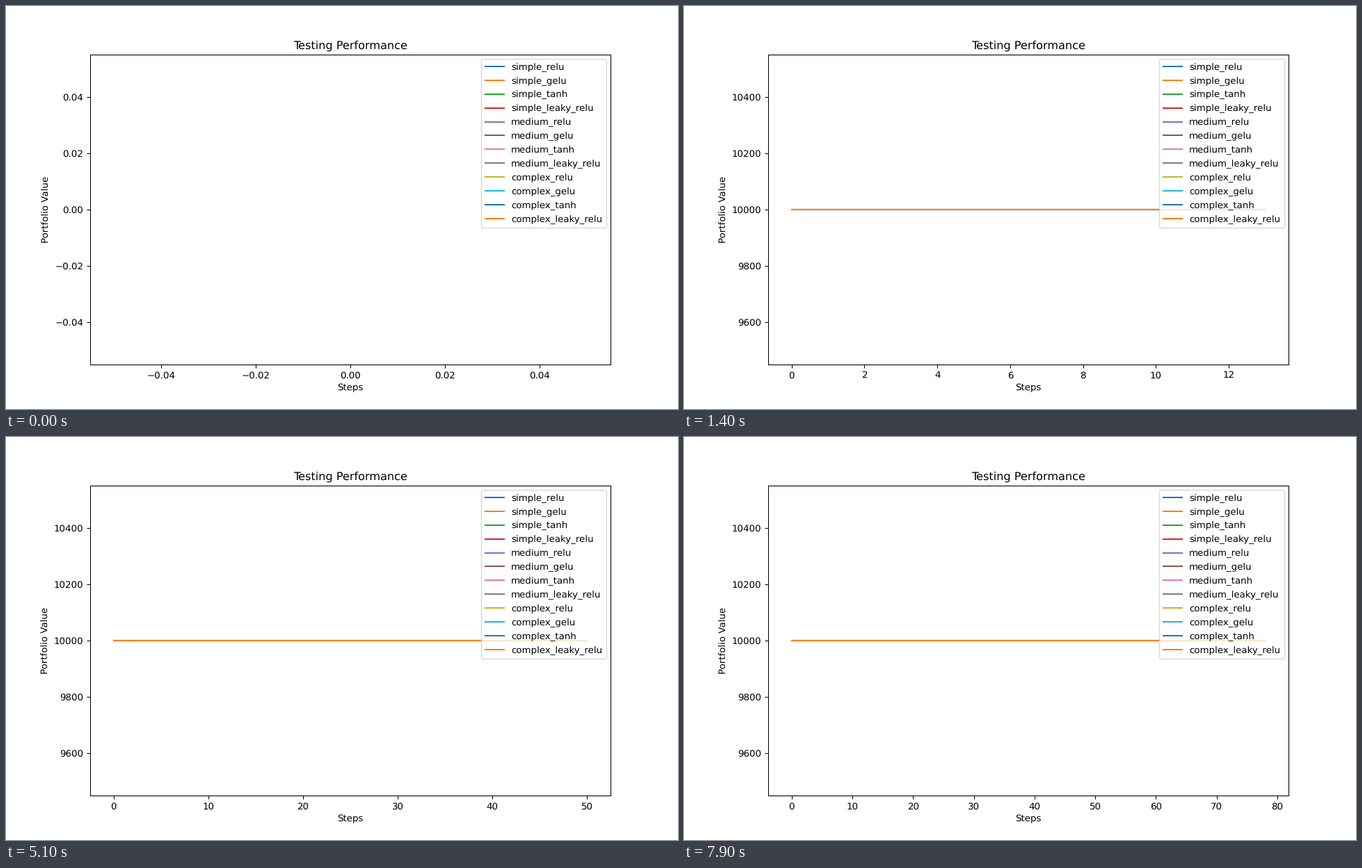
A matplotlib script that plays this animation: 966 px wide and 580 px high, repeating every 8 s.

```python
import itertools

import matplotlib.pyplot as plt
import numpy as np
from matplotlib.animation import FuncAnimation

WIDTH, HEIGHT, DPI = 966, 580, 96.6
FRAMES = 80
INTERVAL = 100
START_VALUE = 10000

sizes = ["simple", "medium", "complex"]
activations = ["relu", "gelu", "tanh", "leaky_relu"]

plt.rcParams.update({
    "font.family": "DejaVu Sans",
    "text.hinting": "none",
    "legend.labelspacing": 0.52,
})
fig, ax = plt.subplots(figsize=(WIDTH / DPI, HEIGHT / DPI), dpi=DPI)
lines = [
    ax.plot([], [], label=f"{size}_{act}")[0]
    for size, act in itertools.product(sizes, activations)
]
ax.set_title("Testing Performance")
ax.set_xlabel("Steps")
ax.set_ylabel("Portfolio Value")
ax.legend(loc="best")


def update(n):
    """Show the first n steps; the axes and the legend adapt to the data."""
    steps = np.arange(n)
    values = np.full(n, START_VALUE)
    for line in lines:
        line.set_data(steps, values)
    ax.relim()
    ax.autoscale_view()
    return lines


anim = FuncAnimation(fig, update, frames=FRAMES, interval=INTERVAL,
                     init_func=lambda: update(0), repeat=True)
plt.show()
```
